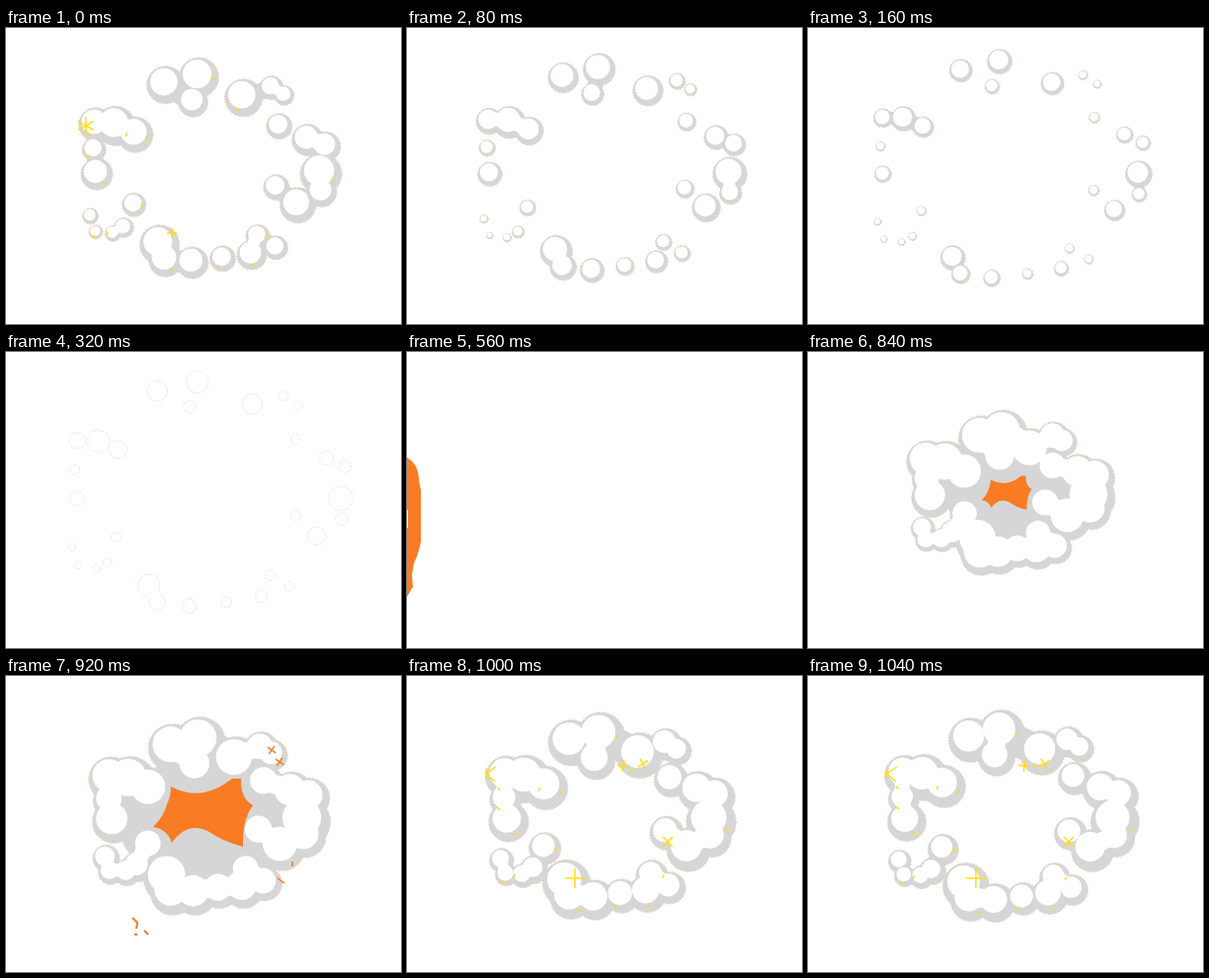
Animation of 400x300 px, one loop 1.08 s. Source, as an HTML page:

```html
<!DOCTYPE html>
<html lang="en">
<head>
<meta charset="utf-8">
<title>Smoke puff</title>
<style>
html, body { margin: 0; width: 100%; height: 100%; overflow: hidden; background: #fff; }
svg { display: block; width: 100vw; height: 100vh; }
</style>
</head>
<body>
<svg id="stage" viewBox="0 0 400 300"></svg>
<script>
const GREY = '#d6d6d6', WHITE = '#fff', ORANGE = '#f97b24', YELLOW = '#ffdd12', RIM = '#f0a050';
const CENTER = { x: 203, y: 147 };
const LOOP = 1080, BIRTH = 760, FLASH = 560, FULL = 160;
const STEPS = [0, 40, 80, 120, 160, 200, 240, 320, 400, 480, 560, 760, 840, 880, 920, 960, 1000, 1040];

// The ring of smoke: each clump is a chain of lobes (x, y, radius).
const CLUMPS = [
  '138,112,22 118,103,24 98,101,21 97,125,16 100,148,20',
  '165,65,23 191,83,19 196,58,24 237,78,23 264,67,16 276,74,14',
  '270,104,17 298,116,20 316,122,19 311,148,25 312,165,19 288,177,22 266,160,17',
  '93,188,12 98,203,11 115,204,12 126,198,14 137,176,16',
  '160,213,24 165,228,21 190,230,20 218,226,17 245,223,19 250,205,16 268,217,16'
].map(text => text.split(' ').map(lobe => {
  const [x, y, r] = lobe.split(',').map(Number);
  return { x, y, r };
}));

// push: distance moved outwards; grow: change of radius; light: share of a lobe that is lit.
const LIFE = [
  { age: 0, push: -52, grow: -3, light: .87 },
  { age: 80, push: -25, grow: 0, light: .77 },
  { age: 160, push: -9, grow: 1.5, light: .74 },
  { age: 280, push: 0, grow: -.5, light: .7 },
  { age: 320, push: 8, grow: -4, light: .73 },
  { age: 480, push: 24, grow: -11.5, light: .78 },
  { age: 640, push: 28, grow: -13, light: 1 },
  { age: 800, push: 30, grow: -14, light: 1 }
];

const mix = (a, b, k) => a + (b - a) * k;
const clamp = v => Math.min(1, Math.max(0, v));

function lifeAt(age) {
  const i = Math.max(1, LIFE.findIndex(key => key.age >= age));
  const a = LIFE[i - 1], b = LIFE[i];
  const k = (age - a.age) / (b.age - a.age);
  return {
    push: mix(a.push, b.push, k),
    grow: mix(a.grow, b.grow, k),
    light: mix(a.light, b.light, k)
  };
}

const moved = ({ push, grow }) => ({ x, y, r }) => {
  const dx = x - CENTER.x, dy = y - CENTER.y;
  const k = 1 + push / Math.hypot(dx, dy);
  return { x: CENTER.x + dx * k, y: CENTER.y + dy * k, r: Math.max(r + grow, r * .3) };
};

// The lit part shrinks towards the top left of its lobe.
const lit = share => ({ x, y, r }) => {
  const shift = (1 - share) * r * .7;
  return { x: x - shift * .5, y: y - shift * .9, r: r * share };
};

const circle = ({ x, y, r }, paint) => `<circle cx="${x}" cy="${y}" r="${r}" ${paint}/>`;
const path = (d, fill) => `<path d="${d}" fill="${fill}"/>`;
const lines = (d, color, width = 1.5) =>
  `<path d="${d}" fill="none" stroke="${color}" stroke-width="${width}"/>`;
const scaled = (k, content) =>
  `<g transform="translate(${CENTER.x} ${CENTER.y}) scale(${k}) translate(${-CENTER.x} ${-CENTER.y})">${content}</g>`;

// Lobes that touch are joined by a neck, which softens the notch between them.
function blob(lobes, color) {
  const necks = lobes.slice(1).map((b, i) => {
    const a = lobes[i];
    if (Math.hypot(a.x - b.x, a.y - b.y) > a.r + b.r) return '';
    return lines(`M${a.x} ${a.y}L${b.x} ${b.y}`, color, Math.min(a.r, b.r) * 1.4);
  });
  return necks.join('') + lobes.map(lobe => circle(lobe, `fill="${color}"`)).join('');
}

const star = (x, y, r, arms = 2, turn = 0) => Array.from({ length: arms }, (_, i) => {
  const a = turn + i * Math.PI / arms;
  const dx = r * Math.cos(a), dy = r * Math.sin(a);
  return `M${x - dx} ${y - dy}L${x + dx} ${y + dy}`;
}).join('');

function randomFrom(seed) {
  return () => (seed = seed * 16807 % 2147483647) / 2147483647;
}

// Short glints scattered low on the lobes.
function glints(lobes) {
  const random = randomFrom(77);
  return lobes.filter(() => random() < .4).map(({ x, y, r }) => {
    const a = random() * Math.PI;
    return star(x + r * .7 * Math.cos(a), y + r * .7 * Math.sin(a), 2, 1, random() * 3);
  }).join('');
}

const FIRE = path('M167 112Q195 127 222 109L229 104H238Q237 124 250 131Q239 146 240 173Q218 167 206 158Q184 146 168 169Q163 155 149 153Q160 142 163 130Q167 122 167 112z', ORANGE);
const EMBERS = lines(star(269, 75, 5, 2, .6) + star(277, 87, 5, 2, .6) + 'M275 205l7 5M290 188v5', ORANGE) +
  lines('M128 245l5 5-1 6M130 262h3M140 258l4 4', ORANGE, 2);
const FLARE = path('M0 107Q12 114 12 130L14 140V192Q12 204 7 214L5 226 6 238 0 248V178H1V160H0z', ORANGE);
const RING_STARS = 'M90 92l-10 7 9 8M80 94v10' + star(170, 205, 10) + star(264, 168, 7, 2, .8) +
  star(219, 91, 6, 2, .1) + star(239, 89, 6, 2, 1);
const LATE_STARS = star(81, 99, 9, 3, .5) + star(168, 208, 5);

function core(age) {
  if (age > FULL) return '';
  const k = age / FULL;
  const haze = `<ellipse cx="${CENTER.x}" cy="${CENTER.y}" rx="90" ry="66" fill="${GREY}"/>`;
  return scaled(mix(.4, 1, k), haze);
}

function sparks(age, lobes) {
  if (age === FULL) return EMBERS;
  if (age < 240 || age > 320) return '';
  return lines((age < 320 ? RING_STARS : LATE_STARS) + glints(lobes), YELLOW);
}

function smoke(age) {
  const life = lifeAt(age);
  const shade = CLUMPS.map(clump => clump.map(moved(life)));
  const lobes = shade.flat();
  const rim = `fill="none" stroke="${RIM}" stroke-dasharray="1 2" opacity="${clamp((800 - age) / 200)}"`;
  return lobes.map(lobe => circle(lobe, rim)).join('') +
    core(age) +
    shade.map(clump => blob(clump, GREY)).join('') +
    (age <= FULL ? scaled(age / FULL, FIRE) : '') +
    shade.map(clump => blob(clump.map(lit(life.light)), WHITE)).join('') +
    sparks(age, lobes);
}

function draw(t) {
  if (t >= FLASH && t < BIRTH) return FLARE;
  const age = (t - BIRTH + LOOP) % LOOP;
  return age < 800 ? smoke(age) : '';
}

const stage = document.getElementById('stage');
let shown = -1;

function update(time) {
  const t = time % LOOP;
  const step = STEPS.findLast(start => start <= t);
  if (step === shown) return;
  stage.innerHTML = draw(step);
  shown = step;
}

const begin = performance.now();
function tick() {
  update(performance.now() - begin);
  requestAnimationFrame(tick);
}
tick();
</script>
</body>
</html>
```
